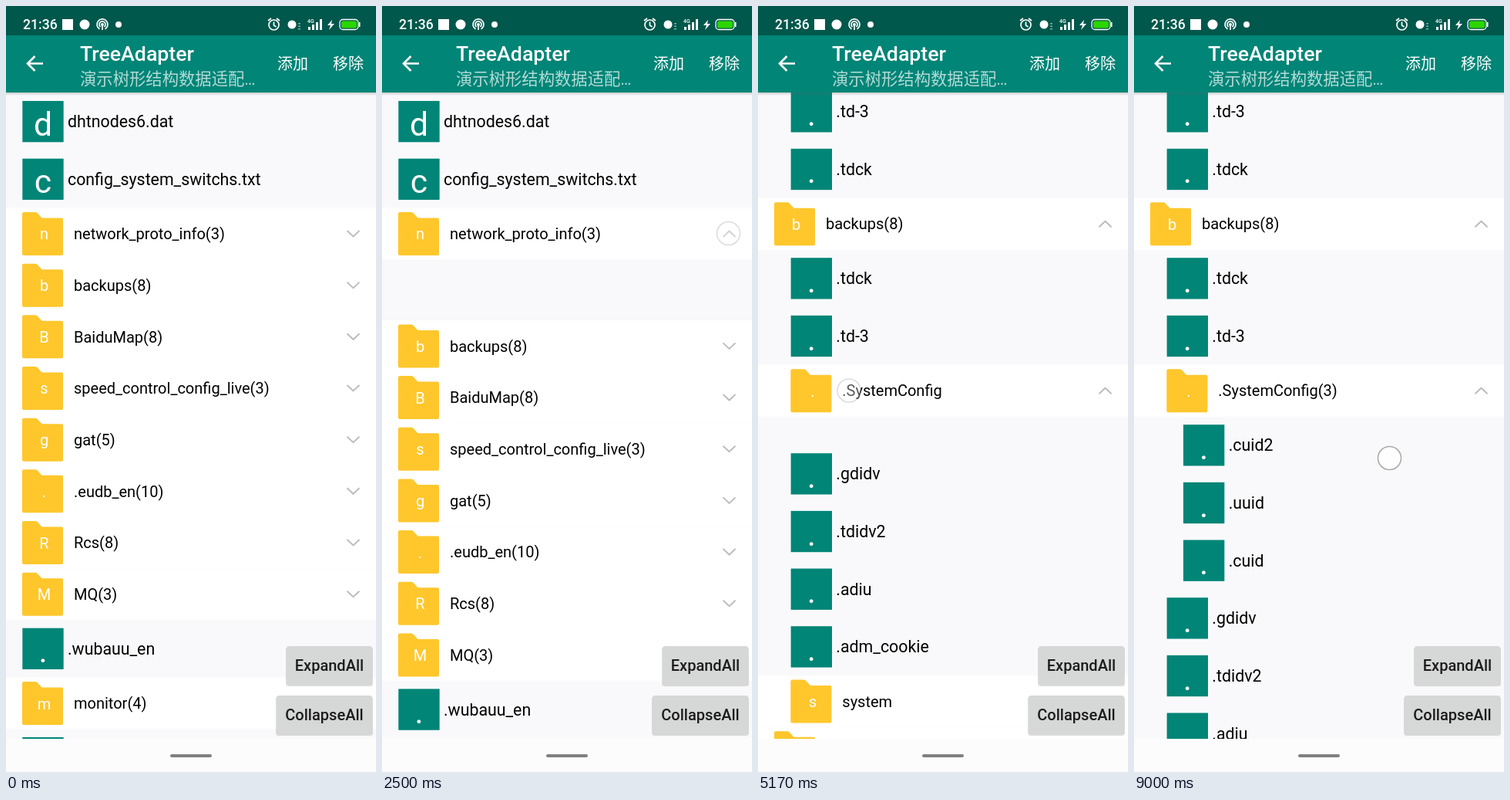
These frames come from a looping animation (480 by 992 pixels, 9170 ms). An HTML page:

```html
<!DOCTYPE html>
<html lang="zh">
<head>
<meta charset="utf-8">
<title>TreeAdapter</title>
<style>
  html, body { margin: 0; width: 100%; height: 100%; overflow: hidden; background: #fcfcfd; }
  svg { display: block; width: 100%; height: 100%; }
  text { font-family: Roboto, "Noto Sans CJK SC", "Noto Sans CJK", sans-serif; white-space: pre; }
  .mid { text-anchor: middle; }
  .medium { font-weight: 500; }
</style>
</head>
<body>
<svg viewBox="0 0 480 992" xmlns="http://www.w3.org/2000/svg">
  <defs>
    <clipPath id="view"><rect y="112" width="480" height="837"/></clipPath>
    <linearGradient id="shade" x2="0" y2="1">
      <stop stop-color="#606060" stop-opacity=".3"/>
      <stop offset="1" stop-color="#606060" stop-opacity="0"/>
    </linearGradient>
  </defs>
  <rect width="480" height="992" fill="#fcfcfd"/>
  <g clip-path="url(#view)">
    <rect y="112" width="480" height="837" fill="#f9f9fb"/>
    <g id="list"></g>
  </g>
  <rect y="112" width="480" height="4" fill="url(#shade)"/>

  <g id="bar">
    <rect width="480" height="38" fill="#00574b"/>
    <rect y="38" width="480" height="74" fill="#008577"/>
    <g fill="#fff">
      <text class="medium" x="22" y="30" font-size="17.6">21:36</text>
      <rect x="73" y="17" width="14" height="14"/>
      <circle cx="102" cy="24" r="6.5"/>
      <circle cx="125" cy="24" r="2"/>
      <circle cx="146" cy="24" r="4"/>
      <circle cx="371" cy="24" r="5.5"/>
      <path d="M379 22h3v1.5h-3zM379 25.5h3v1.5h-3zM379 29h3v1.5h-3z" opacity=".5"/>
      <text class="medium" x="391" y="22" font-size="7">4G</text>
      <path d="M392 27h3v4h-3zM397 24h3v7h-3zM402 21h3v10h-3zM407 17h3v14h-3z"/>
      <path d="M423 18l-6 7h4l-2 6 7-8h-4z"/>
    </g>
    <g fill="none" stroke="#fff" stroke-width="1.7">
      <path d="M121.5 30a7 7 0 1 1 7 0M122.5 27a4 4 0 1 1 5 0M125 25v6"/>
      <circle cx="347.5" cy="24.5" r="6.5"/>
      <path d="M347.5 20.5v4.5l3 2M340 19l4-3M355 19l-4-3"/>
      <rect x="433" y="17.5" width="24" height="13" rx="4" stroke-width="1.3"/>
    </g>
    <rect x="435" y="19.5" width="20" height="9" rx="2" fill="#2bd500"/>
    <rect x="458" y="21" width="1.5" height="6" fill="#fff"/>
    <path d="M48 74.5H28.5M37.5 65L28 74.5L37.5 84" fill="none" stroke="#fff" stroke-width="2.6"/>
    <g fill="#fff">
      <text class="medium" x="96" y="71" font-size="26.67">TreeAdapter</text>
      <text x="96" y="101.5" font-size="21.33" opacity=".7">演示树形结构数据适配…</text>
      <text class="medium" x="352" y="82" font-size="20">添加</text>
      <text class="medium" x="424" y="82" font-size="20">移除</text>
    </g>
  </g>

  <g id="buttons"></g>
  <rect x="213" y="969" width="54" height="4" rx="2" fill="#808080"/>
  <circle id="touch" r="15" fill="#fff" fill-opacity=".85" stroke="#a8a8a8" stroke-width="1.5"/>
</svg>
<script>
const LOOP = 9170, TOP = 112.3, FILE_H = 74.67, DIR_H = 66.67, INDENT = 21.33;
const $ = id => document.getElementById(id);
const list = $('list'), touch = $('touch');

function el(parent, tag, attrs, label) {
  const e = document.createElementNS('http://www.w3.org/2000/svg', tag);
  for (const k in attrs) e.setAttribute(k, attrs[k]);
  if (label) e.textContent = label;
  return parent.appendChild(e);
}

// A trailing slash marks a folder.
const parse = s => s.split(' ').map(n => ({ name: n.replace('/', ''), dir: n.endsWith('/') }));
const tree = parse('dhtnodes6.dat config_system_switchs.txt network_proto_info(3)/ backups(8)/ ' +
  'BaiduMap(8)/ speed_control_config_live(3)/ gat(5)/ .eudb_en(10)/ Rcs(8)/ MQ(3)/ .wubauu_en ' +
  'monitor(4)/ .g_b_d_v mz_browser_crash_log(12)/ cmcc_sso_south_log(4)/ .mn_-669164032 ' +
  '.wubasid_en sg_data com.cainiao.wireless(3)/ ..ccdid Installation(4)/ xiami(8)/ Alarms(4)/ ' +
  'qiangwan(3)/ voice(5)/ usblog(3)/ .lls');
const net = tree[2], backups = tree[3];
net.kids = parse('configId(network_proto_info_default… .td-3 .tdck');
backups.kids = parse('.tdck .td-3 .SystemConfig/ .gdidv .tdidv2 .adiu .adm_cookie system/');
const sys = backups.kids[2];
sys.kids = parse('.cuid2 .uuid .cuid');

const FOLDER = 'M21-26q0-2 2-2H37.5q2 0 3 1L46.5-20.5H72q2 0 2 2V26q0 2-2 2H23q-2 0-2-2z';
const rows = [];

function build(nodes, depth) {
  for (const n of nodes) {
    const g = n.g = el(list, 'g', {});
    rows.push(n);
    n.h = n.dir ? DIR_H : FILE_H;
    if (n.dir) el(g, 'rect', { y: -n.h / 2, width: 480, height: n.h, fill: '#fff' });
    const body = el(g, 'g', { transform: `translate(${depth * INDENT})` });
    if (n.dir) {
      el(body, 'path', { d: FOLDER, fill: '#ffc72c' });
      el(body, 'text', { class: 'mid', x: 49.5, y: 7.5, 'font-size': 20, fill: '#fff' }, n.name[0]);
      n.arrow = el(g, 'path', { d: 'M442.5-4L450.5 3.5L458.5-4', fill: 'none', stroke: '#bdbdbd', 'stroke-width': 2 });
    } else {
      el(body, 'rect', { x: 21.33, y: -26.67, width: 53.33, height: 53.33, fill: '#008577' });
      el(body, 'text', { class: 'mid', x: 48, y: 18, 'font-size': 42.67, fill: '#fff' }, n.name[0]);
    }
    n.label = el(body, 'text', { x: n.dir ? 88 : 80, y: n.dir ? 7.3 : 7.5, 'font-size': n.dir ? 20 : 21.33 }, n.name);
    if (n.kids) build(n.kids, depth + 1);
  }
}
build(tree, 0);

function button(x, y, label) {
  const w = 475 - x, g = $('buttons');
  el(g, 'rect', { x: x - 1, y: y + 1, width: w + 2, height: 51, rx: 4, fill: '#606060', opacity: .22 });
  el(g, 'rect', { x, y, width: w, height: 50, rx: 3, fill: '#d6d7d7' });
  el(g, 'text', { class: 'mid medium', x: x + w / 2, y: y + 32, 'font-size': 20, fill: '#1c1c1c' }, label);
}
button(364, 829, 'ExpandAll');
button(351, 893, 'CollapseAll');

const clamp = v => Math.max(0, Math.min(1, v));
const swing = v => (1 - Math.cos(Math.PI * clamp(v))) / 2;

function tween(t, keys) {
  let v = keys[0][1];
  for (let i = 1; i < keys.length; i++) {
    const [a, from] = keys[i - 1], [b, to] = keys[i];
    if (t >= a) v = from + (to - from) * swing((t - a) / (b - a));
  }
  return v;
}

const COLLAPSE = 7200, EXPAND = 8400;
const scrollKeys = [[200, 0], [1100, 1026], [1250, 1026], [2150, 0], [4330, 0], [4900, 303.5]];
const openAt = new Map([[net, 2399], [backups, 3947], [sys, 5100]]);

// start, end, x, y, x2, y2, opacity
const touches = [
  [160, 490, 300, 740, 292, 430, 1],
  [1166, 1490, 294, 702, 298, 850, 1],
  [2320, 2560, 449.5, 294.5, 449.5, 294.5, .4],
  [3820, 4100, 78, 567, 78, 567, .4],
  [4320, 4820, 300, 720, 296, 430, 1],
  [4980, 5260, 118, 498, 118, 498, .4],
  [7150, 7400, 413, 918, 413, 918, .8],
  [8320, 8600, 420, 854, 420, 854, .8],
  [8990, LOOP, 331.5, 585.5, 331.5, 585.5, 1]
];

function layout(nodes, y, t, alpha) {
  const collapsed = t >= COLLAPSE && t < EXPAND;
  for (const n of nodes) {
    if (alpha > 0 && y < 950 && y + n.h > 110) {
      n.g.setAttribute('transform', `translate(0 ${(y + n.h / 2).toFixed(2)})`);
      n.g.setAttribute('opacity', alpha);
      n.g.removeAttribute('display');
    }
    y += n.h;
    if (!n.kids) continue;
    // Rows below slide first, then the children fade in.
    const age = collapsed ? -1 : t - openAt.get(n);
    n.arrow.setAttribute('transform', age >= 0 ? 'scale(1 -1)' : '');
    if (age < 0) continue;
    const end = layout(n.kids, y, t, Math.min(alpha, clamp((age - 250) / 120)));
    y += (end - y) * swing(age / 250);
  }
  return y;
}

function draw(time) {
  // The picture advances six times a second.
  const t = Math.floor((time % LOOP + 4) * 0.006) / 0.006;
  for (const n of rows) n.g.setAttribute('display', 'none');
  const scroll = t >= COLLAPSE && t < EXPAND ? 295.4 : tween(t, scrollKeys);
  sys.label.textContent = t >= EXPAND ? '.SystemConfig(3)' : '.SystemConfig';
  layout(tree, TOP - scroll, t, 1);

  const hit = touches.find(([a, b]) => t >= a && t < b);
  touch.setAttribute('display', hit ? 'inline' : 'none');
  if (hit) {
    const [a, b, x, y, x2, y2, o] = hit, p = (t - a) / (b - a);
    touch.setAttribute('cx', x + (x2 - x) * p);
    touch.setAttribute('cy', y + (y2 - y) * p);
    touch.setAttribute('opacity', o);
  }
}

const begin = performance.now();
function tick() {
  draw(performance.now() - begin);
  requestAnimationFrame(tick);
}
tick();
</script>
</body>
</html>
```
